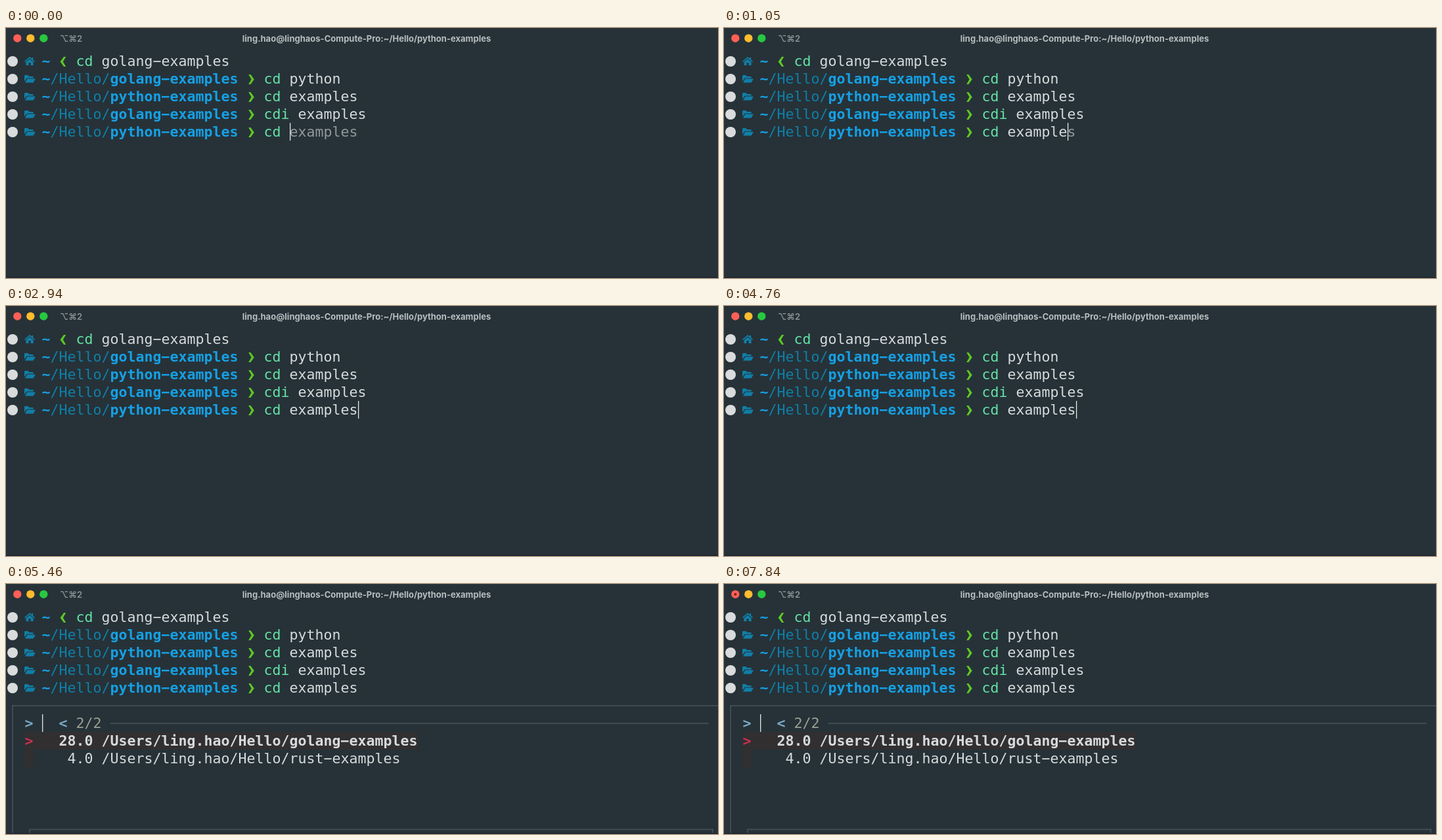
These frames come from a looping animation (1084 px wide and 382 px high, 8 s). An HTML page with a canvas:

```html
<!DOCTYPE html>
<html lang="en">
<head>
<meta charset="utf-8">
<title>Terminal</title>
<style>
  html, body { margin: 0; width: 100%; height: 100%; overflow: hidden; background: #263238; }
  canvas { display: block; width: 1084px; height: 382px; }
</style>
</head>
<body>
<canvas id="stage"></canvas>
<script>
const W = 1084, H = 382, LOOP = 8000;
const CELL = 13, LINE = 27, LEFT = 2.5;
const MONO = '21.6px "DejaVu Sans Mono", monospace';
const UI = 'Inter, sans-serif';
const USER = 'ling.hao';
const C = {
  bg: '#263238', edge: '#1d2330', text: '#d6dadc', hint: '#90989b',
  path: '#107fa8', anchor: '#16a0e4', prompt: '#5fc824', command: '#65e2a5',
  mark: '#d9dbdc', border: '#56646b', accent: '#7aa9c6', count: '#9b9f91',
  select: '#322f31', pointer: '#c9304f'
};
// Moments at which each letter of the argument is typed
const KEYS = [280, 490, 630, 700, 770, 980, 1050, 1260];
const ARG = 'examples';
const ENTER = 5390, OPEN = 5460, BUSY = 6090;

const canvas = document.getElementById('stage');
const ctx = canvas.getContext('2d');
const dpr = window.devicePixelRatio || 1;
canvas.width = W * dpr;
canvas.height = H * dpr;

const colX = col => LEFT + col * CELL;
const rowY = row => 51 + row * LINE;

// The terminal face has a wide, raised hyphen, close to a minus sign
function put(text, col, row, color, bold) {
  ctx.font = (bold ? 'bold ' : '') + MONO;
  ctx.fillStyle = color;
  ctx.fillText(text.replace(/-/g, '\u2212'), colX(col), rowY(row) + 7);
}

function rect(x, y, w, h, color) {
  ctx.fillStyle = color;
  ctx.fillRect(x, y, w, h);
}

function dot(x, y, r, color) {
  ctx.fillStyle = color;
  ctx.beginPath();
  ctx.arc(x, y, r, 0, Math.PI * 2);
  ctx.fill();
}

function shape(x, y, color, d, flip = 1) {
  ctx.save();
  ctx.translate(x, y);
  ctx.scale(flip, 1);
  ctx.fillStyle = color;
  ctx.fill(new Path2D(d), 'evenodd');
  ctx.restore();
}

function cursor(col, row) {
  rect(colX(col) + 0.5, rowY(row) - 14, 1.3, LINE, '#e4e7e8');
}

function chevron(col, row, flip) {
  shape(colX(col) + 6.7, rowY(row) + 0.5, C.prompt,
    'M-4-7.5H-.8L4.6 0-.8 7.5H-4L.4 0Z', flip);
}

function home(row) {
  shape(28, rowY(row), C.path,
    'M8-7 0 0 1 1.2 8-4.8 15 1.2 16 0 13.2-2.5V-6H11V-4.4ZM8-3.6 2.4 1.2V6H6.4V2H9.6V6H13.6V1.2Z');
}

function folder(row) {
  shape(28, rowY(row), C.path,
    'M0 3.6V-4.6Q0-6 1.4-6H5.2L7.2-4H12.4Q13.7-4 13.7-2.7V-1.6H5Q3.6-1.6 2.9-.4Z' +
    'M1 5.5 3.9.3Q4.3-.4 5-.4H15.8Q17-.4 16.4.6L14 4.8Q13.6 5.5 12.8 5.5Z');
}

function promptLine(row, dir) {
  dot(10, rowY(row), 8, C.mark);
  folder(row);
  put('~', 4, row, C.anchor, true);
  put('/Hello/', 5, row, C.path);
  put(dir, 12, row, C.anchor, true);
  chevron(28, row, 1);
}

function titleBar(busy) {
  ['#ff5f57', '#febc2e', '#28c840'].forEach((c, i) => dot(17.3 + i * 20, 15.7, 6.2, c));
  if (busy) dot(17.3, 15.7, 2, '#8a1c14');
  ctx.font = '600 13px ' + UI;
  ctx.fillStyle = '#8c9497';
  ctx.fillText('⌥⌘2', 82, 20.5);
  ctx.font = '700 13px ' + UI;
  ctx.fillStyle = '#b8bec0';
  ctx.textAlign = 'center';
  ctx.fillText(`${USER}@${USER.replace('.', '')}s-Compute-Pro:~/Hello/python-examples`, 549, 20.5);
  ctx.textAlign = 'left';
}

function history() {
  dot(10, rowY(0), 8, C.mark);
  home(0);
  put('~', 4, 0, C.anchor, true);
  chevron(6, 0, -1);
  put('cd', 8, 0, C.command);
  put('golang-examples', 11, 0, C.text);
  [['golang', 'cd', 'python'], ['python', 'cd', ARG], ['golang', 'cdi', ARG]].forEach(([dir, cmd, arg], i) => {
    promptLine(i + 1, dir + '-examples');
    put(cmd, 30, i + 1, C.command);
    put(arg, 31 + cmd.length, i + 1, C.text);
  });
}

function finder() {
  rect(9.5, 185.5, 1, H, C.border);
  rect(9.5, 185.5, W, 1, C.border);
  rect(35.5, 374.5, 1041, 1, C.border);
  rect(35.5, 374.5, 1, 8, C.border);
  rect(1075.5, 374.5, 1, 8, C.border);

  put('>', 2, 6, C.accent, true);
  put('<', 6, 6, C.accent, true);
  put('2/2', 8, 6, C.count);
  rect(158.5, 212.5, 911, 1, C.border);
  cursor(4, 6);

  rect(colX(2), rowY(7) - 14, 46 * CELL, LINE, C.select);
  rect(colX(2), rowY(8) - 14, CELL, LINE, C.select);
  put('>', 2, 7, C.pointer, true);
  put(`28.0 /Users/${USER}/Hello/golang-examples`, 6, 7, C.text, true);
  put(`4.0 /Users/${USER}/Hello/rust-examples`, 7, 8, C.text);
}

function draw(t) {
  ctx.setTransform(dpr, 0, 0, dpr, 0, 0);
  rect(0, 0, W, H, C.bg);
  titleBar(t >= BUSY);
  history();

  const typed = KEYS.filter(k => t >= k).length;
  promptLine(4, 'python-examples');
  put('cd', 30, 4, C.command);
  put(ARG.slice(0, typed), 33, 4, C.text);
  put(ARG.slice(typed), 33 + typed, 4, C.hint);

  if (t >= OPEN) finder();
  else if (t >= ENTER) cursor(0, 5);
  else cursor(33 + typed, 4);
  rect(0, 380.5, W, 1.5, C.edge);
}

const start = performance.now();
function tick() {
  draw((performance.now() - start) % LOOP);
  requestAnimationFrame(tick);
}
tick();
</script>
</body>
</html>
```
